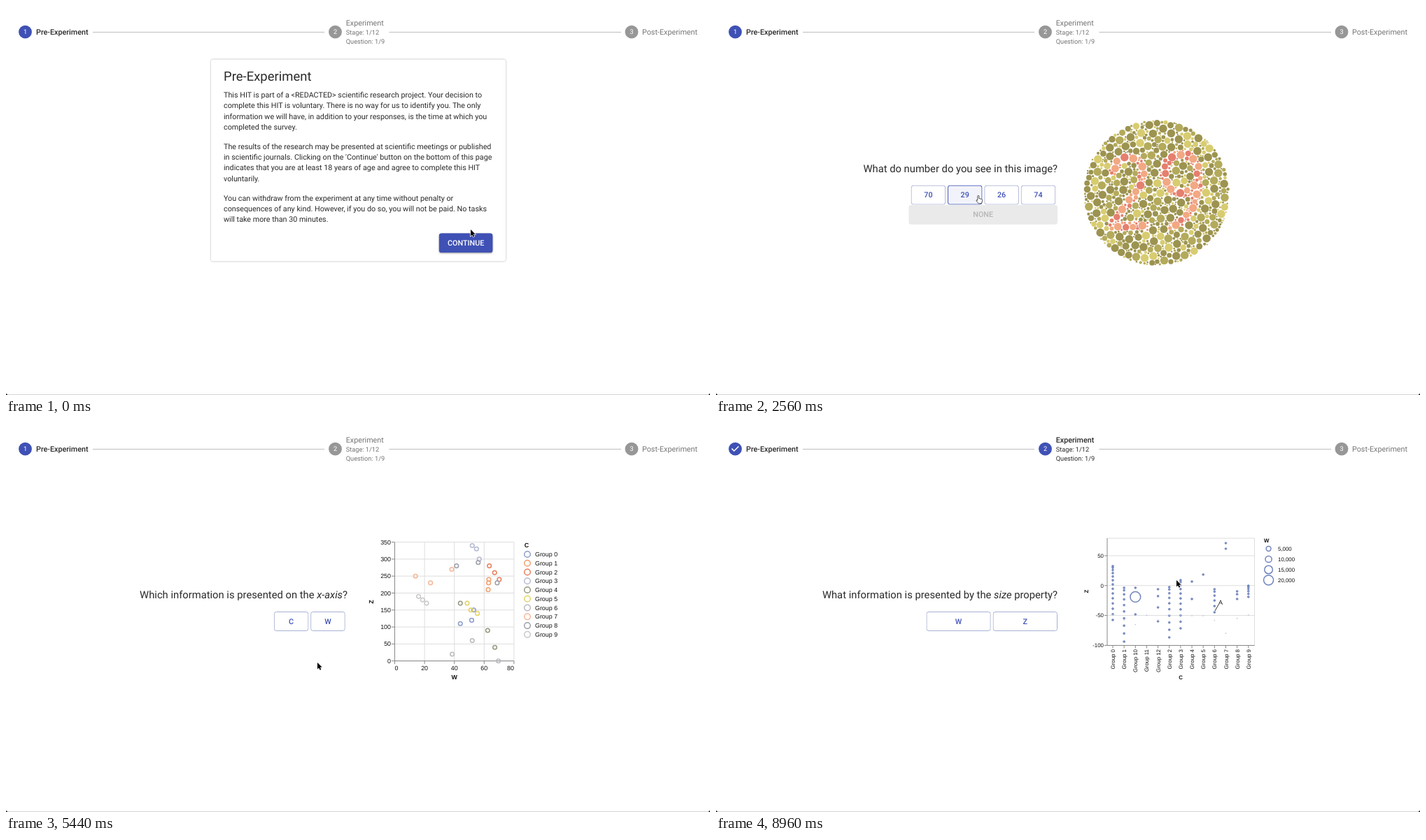
These frames come from a looping animation (1006 px wide and 557 px high, 9.44 s). An HTML page:

```html
<!DOCTYPE html>
<html lang="en">
<head>
<meta charset="utf-8">
<title>Experiment walkthrough</title>
<style>
  html, body { margin: 0; width: 100%; height: 100%; overflow: hidden; background: #fff; }
  svg { display: block; }
  text { font: 10.77px Roboto, sans-serif; fill: #2a2a2a; white-space: pre; text-rendering: geometricPrecision; }
  .title { font-size: 18.48px; }
  .question { font-size: 14.78px; text-anchor: end; }
  .medium { font-weight: 500; }
  .bold { font-weight: 700; }
  .italic { font-style: italic; }
  .under { text-decoration: underline; }
  .caption { font-size: 9.24px; }
  .muted { fill: #757575; }
  .mid { text-anchor: middle; }
  .end { text-anchor: end; }
  .white { fill: #fff; }
  .card { fill: #fff; filter: drop-shadow(0 .9px 1px rgba(0,0,0,.36)); }
  .button text { font-weight: 500; text-anchor: middle; }
  .contained { filter: drop-shadow(0 1.2px 1.3px rgba(0,0,0,.4)); }
  .contained rect { fill: #3f51b5; stroke: #3f51b5; }
  .contained text, .contained circle { fill: #fff; }
  .contained.hover { filter: drop-shadow(0 2px 2.5px rgba(0,0,0,.45)); }
  .contained.hover rect { fill: #303f9f; stroke: #303f9f; }
  .outlined rect { fill: #fff; stroke: #a7b0d2; }
  .outlined text, .outlined circle { fill: #3f51b5; }
  .outlined.hover rect { fill: #f2f3fa; stroke: #3f51b5; }
  .chart text { font: 8.9px "Liberation Sans", Arial, sans-serif; fill: #111; }
  .chart .heading { font-weight: 700; }
  .small text { font-size: 7.9px; }
  .grid { stroke: #ddd; fill: none; }
  .axis { stroke: #888; fill: none; }
  .ring { fill: none; stroke-width: 1.5; }
  .blue { stroke: #7185bd; }
  .speck { fill: #8b9bca; stroke: #5f76b2; stroke-width: .8; }
</style>
</head>
<body>
<svg id="stage" width="1006" height="557" viewBox="0 0 1006 557"></svg>
<script>
const LOOP = 9440, STEP = 80;
const stage = document.getElementById('stage');
const range = (n, f) => Array.from({ length: n }, (_, i) => f(i)).join('');
const seeded = seed => () => (seed = (seed * 16807) % 2147483647) / 2147483647;

const text = (x, y, s, cls = '', extra = '') => `<text x="${x}" y="${y}" class="${cls}" ${extra}>${s}</text>`;
const upright = (x, y, s, cls) => text(0, 0, s, cls, `transform="translate(${x} ${y})rotate(-90)"`);
const span = (cls, s) => `<tspan class="${cls}">${s}</tspan>`;
const lines = (x, y, list) => list.map((s, i) => text(x, y + i * 15.38, s)).join('');
const circle = (x, y, r, attrs) => `<circle cx="${x}" cy="${y}" r="${r}" ${attrs}/>`;
const path = (d, cls, attrs = '') => `<path d="${d}" class="${cls}" ${attrs}/>`;
const card = h => `<rect x="293" y="76.5" width="421" height="${h}" rx="3" class="card"/>`;
const question = (y, s) => text(488, y, s, 'question');

// The nested svg clips the click ripple to the button.
const button = (x, y, w, label, kind = 'outlined') =>
  `<g class="button ${kind}" data-box="${x},${y},${w},28"><svg x="${x}" y="${y}" width="${w}" height="28">
   <rect x=".5" y=".5" width="${w - 1}" height="27" rx="3"/><circle r="0" opacity=".2"/>
   ${text(w / 2, 17.6, label)}</svg></g>`;

const buttonRow = (x, y, options) => options.map((s, i) => button(x + i * 52.35, y, 49.6, s)).join('');

function stepper(started) {
  const tone = started ? '' : 'muted';
  const dot = (x, label, on) => circle(x, 37.2, 9.4, `fill="${on ? '#3f51b5' : '#979797'}"`) +
    text(x, 40.4, label, 'caption mid white');
  return dot(27.5, started ? '' : 1, true) + text(43, 40.7, 'Pre-Experiment', 'medium') +
    (started ? path('M25.9 41.1l-3.9-3.9 1.1-1.1 2.8 2.8 5.9-5.9 1.1 1.1z', 'white') : '') +
    dot(470.5, 2, started) + text(485.7, 28, 'Experiment', started ? 'medium' : 'muted') +
    text(485.7, 41.3, 'Stage: 1/12', 'caption ' + tone) + text(485.7, 53.8, 'Question: 1/9', 'caption ' + tone) +
    dot(894, 3, false) + text(909, 40.7, 'Post-Experiment', 'muted') +
    path('M124 37.5H455M547.5 37.5H879', '', 'stroke="#bdbdbd"');
}

// Dot plate: circles packed from large to small, coloured by distance to the digit's outline.
function plate(outline, cy, seed) {
  const random = seeded(seed), pick = list => list[Math.floor(random() * list.length)];
  const shape = document.createElementNS('http://www.w3.org/2000/svg', 'path');
  shape.setAttribute('d', outline);
  const length = shape.getTotalLength(), radius = 104.5, halfStroke = 6.5;
  const guide = Array.from({ length: 120 }, (_, i) => shape.getPointAtLength(length * i / 119));
  const dots = [];
  for (let cap = 5.8; cap > 1.3; cap *= .78)
    for (let i = 0; i < 14000 / cap; i++) {
      const a = random() * 2 * Math.PI, d = Math.sqrt(random()) * radius;
      const x = 629.5 + d * Math.cos(a), y = cy + d * Math.sin(a);
      const near = guide.reduce((m, p) => Math.min(m, Math.hypot(p.x - x, p.y - y)), radius);
      let r = Math.min(cap, radius - d, Math.abs(near - halfStroke) + .8);
      for (const o of dots) {
        if (r < cap * .8) break;
        r = Math.min(r, Math.hypot(o.x - x, o.y - y) - o.r - .2);
      }
      if (r < cap * .8) continue;
      const fill = pick(near < halfStroke ? ['#e57f6e', '#f2a883'] : ['#9c9350', '#9c9350', '#b3aa5b', '#d8cc70']);
      dots.push({ x, y, r, fill });
    }
  return dots.map(o => circle(o.x.toFixed(1), o.y.toFixed(1), o.r.toFixed(1), `fill="${o.fill}"`)).join('');
}

const quiz = options => question(238, 'What do number do you see in this image?') +
  buttonRow(278.6, 256.6, options) +
  '<rect x="275.5" y="285" width="212.5" height="27.7" rx="3" fill="#eaeaea"/>' +
  text(381.7, 302.4, 'NONE', 'medium mid', 'style="fill:#b5b5b5"');

const pair = (s, options) => question(251.3, s) + buttonRow(382.8, 270, options);

// Each group scatters three points around its anchor: w, z, spread.
function groupChart() {
  const colors = ['#8d9cca', '#f2a06f', '#e77f5c', '#b4b9d0', '#96977f', '#e3d264', '#b9b9be', '#f5b898', '#9c9fa8', '#c8c8c8'];
  const anchors = [[53, 150, 9], [63, 230, 4], [67, 260, 4], [52, 340, 9], [44, 170, 30],
    [51, 150, 5], [52, 60, 25], [24, 230, 18], [56, 290, 20], [16, 190, 12]];
  const random = seeded(31);
  const clamp = (v, max) => Math.max(0, Math.min(max, v));
  const px = w => 555.5 + w * 2.13, py = z => 340.7 - z * .486;
  const ring = (x, y, r, i) => circle(x, y, r, `class="ring" stroke="${colors[i]}"`);
  const scatter = ([w, z, spread], i) => range(3, k => {
    const offset = () => k && (random() * 2 - 1) * spread;
    return ring(px(clamp(w + offset(), 72)), py(clamp(z + Math.round(offset() / 2) * 10, 340)), 2.8, i);
  });
  return '<g class="chart">' +
    range(8, i => path(`M555.5 ${py(i * 50)}h170.4`, 'grid') + path(`M555.5 ${py(i * 50)}h-4.5`, 'axis') +
      text(550, py(i * 50) + 3, i * 50, 'end')) +
    range(5, i => path(`M${px(i * 20)} 340.7v-170`, 'grid') + path(`M${px(i * 20)} 340.7v4.5`, 'axis') +
      text(px(i * 20), 354, i * 20, i === 0 ? '' : i === 4 ? 'end' : 'mid')) +
    path('M555.5 170.7v170h170.4', 'axis') +
    anchors.map(scatter).join('') +
    text(640.8, 367, 'W', 'heading mid') + upright(525, 256, 'Z', 'heading mid') +
    text(740.8, 178, 'C', 'heading') +
    range(10, i => ring(745, 188 + i * 12.76, 4.3, i) + text(756, 191 + i * 12.76, 'Group ' + i)) + '</g>';
}

// Each column spreads its points from top to bottom, denser near the top.
function sizeChart() {
  const columns = [[14, 205, 282], [10, 236, 313], [2, 236, 274], [0, 0, 0], [4, 238, 284], [10, 235, 307],
    [11, 225, 294], [2, 227, 252], [1, 217, 217], [6, 238, 271], [2, 172, 180], [3, 241, 252], [6, 233, 249]];
  const groups = columns.map((_, i) => 'Group ' + i).sort();
  const random = seeded(5);
  const column = ([count, top, bottom], i) => {
    const x = 567 + i * 16.15;
    return path(`M${x} 318.5v4`, 'axis') + upright(x + 3, 324, groups[i], 'end') +
      range(count, k => circle(x, top + (bottom - top) * (k / Math.max(1, count - 1)) ** 1.4, 1.35, 'class="speck"')) +
      circle(x, 275 + 37 * random() ** 4, .9, 'fill="#c3c8d8"');
  };
  const legend = (s, i) => {
    const y = 180 + i * 15, r = 3.4 + i * 1.2;
    return circle(789.6, y, r, 'class="ring blue"') + text(803, y + 2.8, s);
  };
  return '<g class="chart small">' +
    [50, 0, -50, -100].map((z, i) => path(`M559 ${190 + i * 42.8}h210.5`, 'grid') +
      path(`M559 ${190 + i * 42.8}h-4`, 'axis') + text(554, 192.8 + i * 42.8, z, 'end')).join('') +
    path('M559 165h210.5v153.5', 'grid') + path('M559 165v153.5h210.5', 'axis') +
    columns.map(column).join('') +
    circle(599.3, 249, 7.4, 'class="ring blue"') +
    path('M713 269L718.2 260', '', 'stroke="#333"') + text(721, 259.5, 'A', 'mid', 'style="font-size:9px"') +
    text(664, 367, 'C', 'heading mid') + upright(532, 241, 'Z', 'heading mid') +
    text(783, 171, 'W', 'heading') +
    ['5,000', '10,000', '15,000', '20,000'].map(legend).join('') + '</g>';
}

const consent = card(289) + text(311, 106.5, 'Pre-Experiment', 'title') +
  lines(311, 131, ['This HIT is part of a &lt;REDACTED&gt; scientific research project. Your decision to',
    'complete this HIT is voluntary. There is no way for us to identify you. The only',
    'information we will have, in addition to your responses, is the time at which you',
    'completed the survey.']) +
  lines(311, 204.5, ['The results of the research may be presented at scientific meetings or published',
    "in scientific journals. Clicking on the 'Continue' button on the bottom of this page",
    'indicates that you are at least 18 years of age and agree to complete this HIT', 'voluntarily.']) +
  lines(311, 278.6, ['You can withdraw from the experiment at any time without penalty or',
    'consequences of any kind. However, if you do so, you will not be paid. No tasks',
    'will take more than 30 minutes.']) +
  button(618.6, 325.3, 77, 'CONTINUE', 'contained');

const instructions =
  lines(226.5, 157, ['Please read the chart. Questions about the chart will',
    `show data fields such as ${span('bold', 'C')} in ${span('bold', 'bold')}, visual properties`,
    `like ${span('italic', 'size')} in ${span('italic', 'italics')}, and other important words with an`,
    `${span('under', 'underline')}.`]) +
  lines(226.5, 230.5, [`Example 1: Considering all data points for ${span('bold', 'C')}, which of`,
    `the two following values of ${span('bold', 'C')} has the greater ${span('under', 'average')}`,
    `${span('bold', 'W')}?`]) +
  lines(226.5, 289.2, [`Example 2: What information is presented by the ${span('italic', 'color')}`, 'property?']) +
  text(226.5, 332.6, 'Click "Ready" to begin answering questions.') +
  button(427.3, 363.7, 57.8, 'READY', 'contained');

const congratulations = card(169) + text(311, 106.5, 'Congratulations', 'title') +
  lines(311, 131, ['You have successfully completed the pre-screen. You will now complete 12',
    'tasks in a row, each consisting of 9 questions.']) +
  lines(311, 173.8, ['You will be asked to read values of annotated data points. To answer, you can',
    'choose between two options, one of which is correct.']) +
  button(643.7, 205.4, 52, 'NEXT', 'contained');

const sizeQuestion = question(251.3, `What information is presented by the ${span('italic', 'size')} property?`) +
  button(300.5, 270, 92.2, 'W') + button(395.6, 270, 92.4, 'Z');

const eight = 'M609 223a31 25 0 1 0 62 0a31 25 0 1 0 -62 0M583 290a39 34.5 0 1 0 78 0a39 34.5 0 1 0 -78 0';
const twentyNine = 'M568 237C572 208 612 210 610 240C608 268 580 288 566 315H616' +
  'M689 240a24 28 0 1 0 -48 0a24 28 0 1 0 48 0C690 275 682 302 652 315';

// Each layer shows from its start to its end.
const layers = [
  [0, 8080, stepper(false)], [8080, LOOP, stepper(true)],
  [0, 1200, consent],
  [1200, 2400, quiz([5, 9, 8, 3])], [1280, 2400, plate(eight, 266.5, 77)],
  [2400, 3200, quiz([70, 29, 26, 74]) + plate(twentyNine, 267.5, 4211)],
  [3200, 4400, instructions], [3440, 6880, groupChart()],
  [4400, 5840, pair(`Which information is presented on the ${span('italic', 'x-axis')}?`, ['C', 'W'])],
  [5840, 6880, pair(`Which information is presented by ${span('italic', 'color')}?`, ['W', 'C'])],
  [6880, 8080, congratulations],
  [8080, LOOP, sizeQuestion], [8160, LOOP, sizeChart()]];

stage.innerHTML = layers.map(l => `<g>${l[2]}</g>`).join('') +
  path('M0 556.5H1006', '', 'stroke="#d4d4d4"') + path('M0 554.5L2.5 557H0zM1006 554.5L1003.5 557H1006z', '', 'fill="#222"') +
  `<g id="cursor">${path('M0 0V9.4L2.1 7.4 3.6 10.7 5.3 10 3.8 6.8H6.7Z', '', 'stroke="#fff" stroke-width="1.4" paint-order="stroke"')}
  ${path('M-.7 0Q.3-2 1.3 0V3.6L4.8 4.4Q6.3 4.8 6.1 6.3L5.5 9 4.8 10.8H.7L-2.5 7Q-2.8 5.2-1.4 5.8L-.7 6.4Z', '', 'fill="#fff" stroke="#444" stroke-width=".9"')}</g>`;

const groups = [...stage.children].slice(0, layers.length);
const cursor = document.getElementById('cursor');
const [arrow, hand] = cursor.children;
const buttons = [...stage.querySelectorAll('.button')].map(node => ({
  node, ripple: node.querySelector('circle'), box: node.dataset.box.split(',').map(Number)
}));

// Moves: start, end, x, y
const moves = [
  [0, 880, 649, 338], [1680, 2000, 447.5, 284.8], [2000, 2160, 406, 272], [2400, 2640, 363.5, 272],
  [3840, 4160, 452, 371], [5280, 5440, 445, 343], [5440, 5600, 459.5, 288], [7280, 7760, 658, 225]];
const handTimes = [[2000, 3920], [5600, 6880]];
const clicks = [960, 2160, 3000, 4200, 5640, 6080, 7840];

function pointer(t) {
  let x = 664, y = 320;
  for (const [from, to, x1, y1] of moves) {
    const u = Math.max(0, Math.min(1, (t - from) / (to - from))), e = u * u * (3 - 2 * u);
    x += (x1 - x) * e;
    y += (y1 - y) * e;
  }
  return { x, y };
}

function draw(now) {
  const t = Math.floor((now % LOOP) / STEP) * STEP;
  const during = ([from, to]) => t >= from && t < to;
  groups.forEach((g, i) => g.style.display = during(layers[i]) ? '' : 'none');
  const { x, y } = pointer(t);
  const age = t - (clicks.findLast(c => c <= t) ?? -LOOP);
  for (const { node, ripple, box: [bx, by, w, h] } of buttons) {
    const over = x >= bx && x <= bx + w && y >= by && y <= by + h;
    node.classList.toggle('hover', over);
    ripple.setAttribute('cx', x - bx);
    ripple.setAttribute('cy', y - by);
    ripple.setAttribute('r', over && age < 240 ? 4 + age * .09 : 0);
  }
  const pointing = handTimes.some(during);
  cursor.setAttribute('transform', `translate(${x.toFixed(1)} ${y.toFixed(1)})`);
  arrow.style.display = pointing ? 'none' : '';
  hand.style.display = pointing ? '' : 'none';
  requestAnimationFrame(() => draw(performance.now() - start));
}

const start = performance.now();
draw(0);
</script>
</body>
</html>
```
